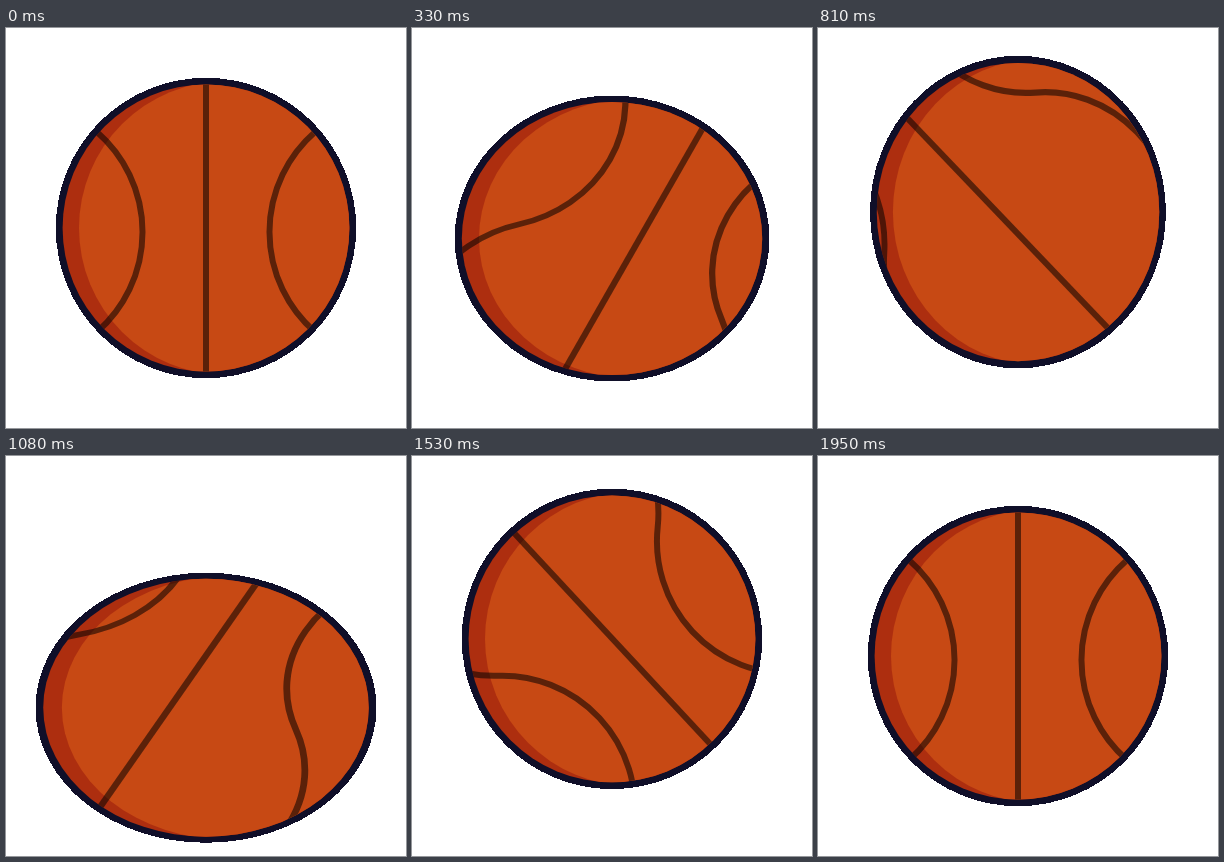
Write an HTML page that moves like this. It is 400 px wide and 400 px high and loops after 2.04 s.

```html
<!DOCTYPE html>
<html lang="en">
<head>
<meta charset="utf-8">
<title>Bouncing basketball</title>
<style>
  html, body { margin: 0; width: 100%; height: 100%; overflow: hidden; background: #fff; }
  svg { display: block; width: 100vw; height: 100vh; }
  .rim { fill: #100f29; shape-rendering: crispEdges; }
  .shade { fill: #ad2e0f; }
  .skin { fill: #c74914; }
  .seams { fill: none; stroke: #000; stroke-opacity: .54; stroke-width: 6; }
</style>
</head>
<body>
<svg viewBox="0 0 400 400">
  <defs>
    <clipPath id="inside"><circle r="143.4"/></clipPath>
    <path id="wave"/>
  </defs>
  <g id="ball">
    <circle class="rim" r="150.2"/>
    <g clip-path="url(#inside)">
      <circle class="shade" r="147"/>
      <circle class="skin" cx="20" r="147"/>
      <g id="seams" class="seams">
        <path d="M0-500V700"/>
        <use href="#wave"/>
        <use href="#wave" transform="scale(-1 1)"/>
      </g>
    </g>
  </g>
</svg>
<script>
  const LOOP = 2040, STEP = 30, MOVE = 1950;
  const PERIOD = 400;   // length of one seam wave
  const ball = document.getElementById('ball');
  const seams = document.getElementById('seams');

  const half = PERIOD / 2;
  const arcs = `a132.6 132.6 0 0 1 0 ${half}a132.6 132.6 0 0 0 0 ${half}`;
  document.getElementById('wave').setAttribute('d', 'M-109-496' + arcs.repeat(3));

  const ease = s => s * s * (3 - 2 * s);

  // Eased moves between [time, value] poses; the last one holds
  const poses = (...keys) => t => {
    const i = keys.findIndex(([time]) => time > t);
    if (i < 0) return keys[keys.length - 1][1];
    const [t0, v0] = keys[i - 1], [t1, v1] = keys[i];
    return v0 + (v1 - v0) * ease((t - t0) / (t1 - t0));
  };

  // Crouch, hang at the top, land, small hop, rest
  const height = poses([0, 200], [120, 236], [630, 167], [690, 167], [1110, 253], [1560, 182], [MOVE, 200]);
  const width = poses([0, 1], [120, 1.067], [780, .985], [930, .985], [1110, 1.147], [1530, 1]);
  const stretch = poses([0, 1], [120, .933], [930, 1.047], [1110, .887], [1530, 1]);
  const swing = poses([0, 0], [660, 1], [1620, 0]);

  function draw(now) {
    const t = Math.min(MOVE, Math.floor(now % LOOP / STEP) * STEP);
    const spin = ease(t / MOVE), away = swing(t);
    // The seams turn once, slide one wave along the middle line and swing out and back
    const x = away * (33 + 17 * Math.sin(4 * Math.PI * spin));
    const y = -PERIOD * spin - 92 * away;
    ball.setAttribute('transform', `translate(200 ${height(t)}) scale(${width(t)} ${stretch(t)})`);
    seams.setAttribute('transform', `rotate(${360 * spin}) translate(${x} ${y})`);
  }

  const start = performance.now();
  function tick() {
    draw(performance.now() - start);
    requestAnimationFrame(tick);
  }
  tick();
</script>
</body>
</html>
```
